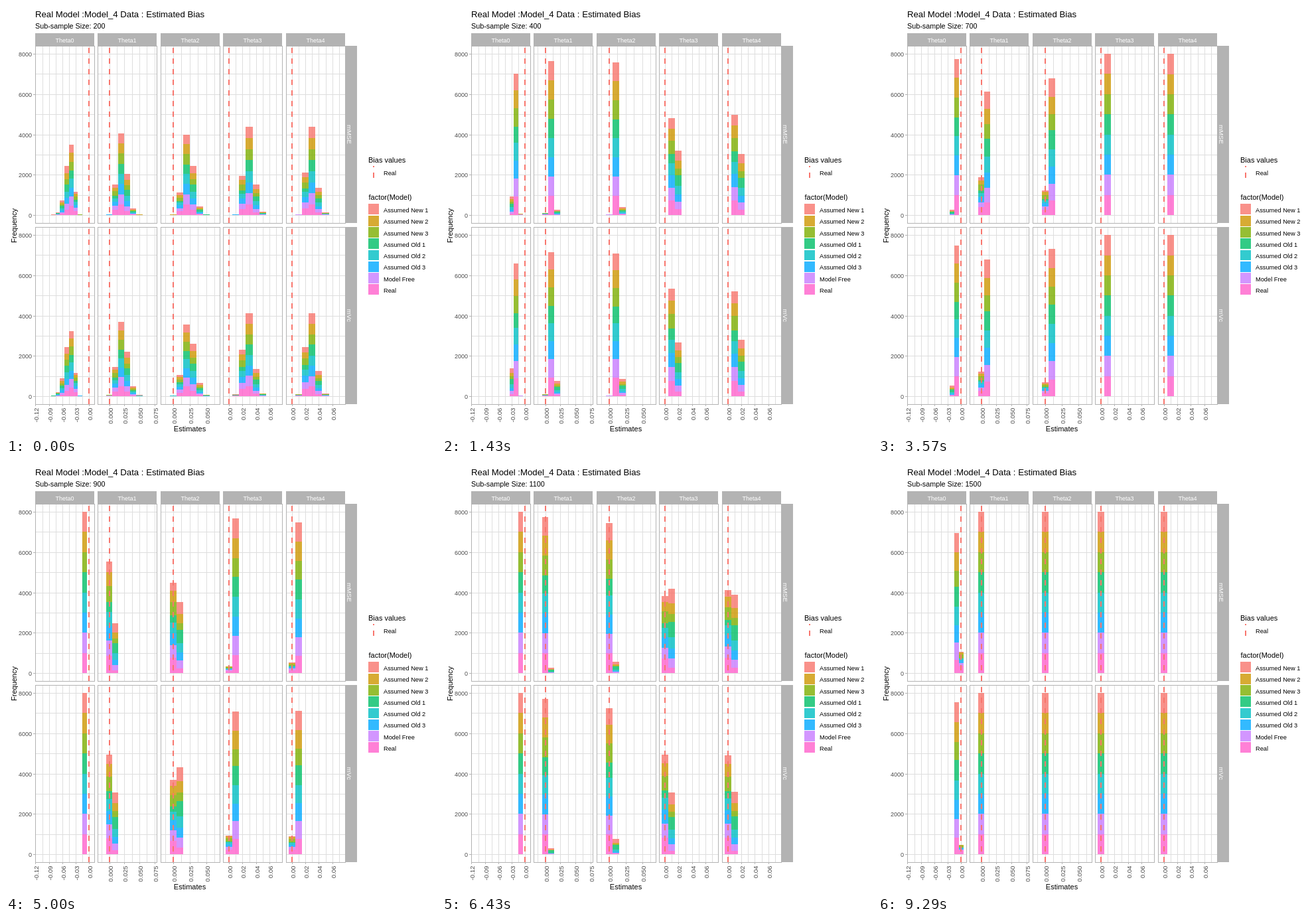
These frames come from a looping animation (648 by 648 pixels, 10 s). An HTML page:

```html
<!DOCTYPE html>
<html lang="en">
<head>
<meta charset="utf-8">
<title>Estimated Bias</title>
<style>
  html, body { margin: 0; width: 100%; height: 100%; overflow: hidden; background: #fff; }
  svg { display: block; width: 648px; height: 648px; font-family: "Liberation Sans", Arial, sans-serif; }
  rect, line { shape-rendering: crispEdges; }
  .grid { stroke: #dedede; }
  .tick { stroke: #b3b3b3; }
  .border { fill: none; stroke: #b3b3b3; }
  .strip { fill: #b3b3b3; }
  .bar { fill-opacity: .8; }
  .zero { stroke: #f8766d; stroke-width: 2; stroke-dasharray: 8 8; }
  text { font-size: 11px; }
  .title { font-size: 13.2px; }
  .subtitle { font-size: 10.8px; }
  .axis { font-size: 9px; fill: #4d4d4d; }
  .head { font-size: 9px; fill: #fff; text-anchor: middle; }
  .turned { font-size: 9.7px; }
  .key { font-size: 9.25px; }
  .mid { text-anchor: middle; }
  .end { text-anchor: end; }
</style>
</head>
<body>
<svg id="plot" viewBox="0 0 648 648"></svg>
<script>
const LOOP = 10000, STATES = 14;
const UNIT = 243 / 8000;               // pixels per count
const PANEL_W = 89, PANEL_H = 267;

// The relative spread of a row shrinks as 1 + decay / sample size.
const ROWS = [
  { name: 'mMSE', top: 60, zero: 315, decay: 300 },
  { name: 'mVc', top: 333, zero: 588, decay: 335 }
];

// Stacked from bottom to top; shift is each model's displacement in spreads.
const MODELS = [
  { name: 'Real', color: '#ff61cc', shift: -.86 },
  { name: 'Model Free', color: '#c77cff', shift: -.21 },
  { name: 'Assumed Old 3', color: '#00a9ff', shift: -.16 },
  { name: 'Assumed Old 2', color: '#00bfc4', shift: .09 },
  { name: 'Assumed Old 1', color: '#00be67', shift: .89 },
  { name: 'Assumed New 3', color: '#7cae00', shift: -.41 },
  { name: 'Assumed New 2', color: '#cd9600', shift: .04 },
  { name: 'Assumed New 1', color: '#f8766d', shift: .64 }
];

// Median bias is drift / sample size, measured in bins from zero.
const KNOTS = [0, 1, 3, 5, 7, 9, 13];
const THETAS = [
  { x: 44, zero: 125.2, bin: -6.75, grid: 10.1, first: -8, last: 0, skew: 0, spread: .08,
    labels: ['-0.12', '-0.09', '-0.06', '-0.03', '0.00'],
    drift: [[862, 853, 840, 848, 850, 855, 835], [874, 871, 870, 878, 885, 890, 874]] },
  { x: 138, zero: 155.8, bin: 9.04, grid: 11.33, first: -1, last: 6, skew: 4, spread: .14,
    labels: ['0.000', '0.025', '0.050', '0.075'],
    drift: [[420, 411, 404, 409, 411, 412, 410], [434, 433, 455, 443, 425.5, 413.5, 415]] },
  { x: 233, zero: 252, bin: 9.95, grid: 12.4, first: -1, last: 5, skew: 4, spread: .13,
    labels: ['0.000', '0.025', '0.050'],
    drift: [[447, 444, 418, 431, 438.5, 441, 445], [466, 464, 455, 472, 458, 448, 450]] },
  { x: 327, zero: 336.1, bin: 10.15, grid: 10.15, first: 0, last: 7, skew: 2, spread: .09,
    labels: ['0.00', '0.02', '0.04', '0.06'],
    drift: [[586, 577, 576.5, 580, 563, 553.5, 550], [570, 554, 566, 565, 526, 531, 535]] },
  { x: 422, zero: 431, bin: 10.1, grid: 10.1, first: 0, last: 7, skew: 2, spread: .09,
    labels: ['0.00', '0.02', '0.04', '0.06'],
    drift: [[577, 570, 573, 565, 547.5, 548, 545], [563, 554, 574, 565, 528, 532, 535]] }
];

const svg = document.getElementById('plot');

function add(parent, tag, attrs, text) {
  const el = document.createElementNS('http://www.w3.org/2000/svg', tag);
  for (const name in attrs) el.setAttribute(name, attrs[name]);
  if (text) el.textContent = text;
  return parent.appendChild(el);
}
const group = () => add(svg, 'g', {});
const line = (parent, cls, x1, y1, x2, y2) => add(parent, 'line', { class: cls, x1, y1, x2, y2 });
const rect = (parent, cls, x, y, width, height, fill) =>
  add(parent, 'rect', { class: cls, x, y, width, height, ...(fill && { fill }) });
const label = (cls, x, y, text, turn = 0) =>
  add(svg, 'text', { class: cls, transform: `translate(${x} ${y}) rotate(${turn})` }, text);
const pixel = v => Math.round(v) + .5;

const normalCdf = z => 1 / (1 + Math.exp(-1.5976 * z - .07056 * z ** 3));

function driftAt(values, state) {
  let i = 0;
  while (i < KNOTS.length - 2 && state >= KNOTS[i + 1]) i++;
  const part = (state - KNOTS[i]) / (KNOTS[i + 1] - KNOTS[i]);
  return values[i] + (values[i + 1] - values[i]) * part;
}

const backdrop = group(), bars = group(), overlay = group();

function drawPanel(theta, row) {
  const { x, zero, grid, first, last } = theta;
  const bottom = row.top + PANEL_H;
  for (let v = 0; v <= 8000; v += 1000) {
    const y = pixel(row.zero - v * UNIT);
    line(backdrop, 'grid', x, y, x + PANEL_W, y);
  }
  for (let i = first; i <= last; i++) {
    const gx = pixel(zero + i * grid);
    line(backdrop, 'grid', gx, row.top, gx, bottom);
  }
  line(overlay, 'zero', Math.round(zero), bottom, Math.round(zero), row.top);
  rect(overlay, 'border', x + .5, row.top + .5, PANEL_W, PANEL_H);
}

function drawFrame() {
  for (const row of ROWS) {
    for (const theta of THETAS) drawPanel(theta, row);
    rect(overlay, 'strip', 511, row.top, 18, PANEL_H);
    label('head turned', 514, row.top + PANEL_H / 2, row.name, 90);
    for (let v = 0; v <= 8000; v += 2000) {
      const y = pixel(row.zero - v * UNIT);
      line(backdrop, 'tick', 41, y, 44, y);
      label('axis end', 39, y + 3.5, String(v));
    }
  }
  THETAS.forEach((theta, i) => {
    rect(overlay, 'strip', theta.x, 41, PANEL_W, 19);
    label('head', theta.x + PANEL_W / 2, 55, 'Theta' + i);
    const start = theta.first - theta.first % 2;
    theta.labels.forEach((text, j) => {
      const x = pixel(theta.zero + (start + 2 * j) * theta.grid);
      line(backdrop, 'tick', x, 600, x, 603);
      label('axis end turned', x + 4.5, 605.5, text, -90);
    });
  });
  label('title', 44, 17, 'Real Model :Model_4 Data : Estimated Bias');
  label('mid', 277, 641, 'Estimates');
  label('mid', 16, 331, 'Frequency', -90);
}

function drawLegend() {
  label('', 546, 236, 'Bias values');
  line(overlay, 'zero', 554, 259, 554, 241);
  label('key', 569, 255, 'Real');
  label('', 546.5, 292, 'factor(Model)');
  [...MODELS].reverse().forEach((model, i) => {
    const y = 298.4 + i * 17.28;
    const top = Math.round(y);
    rect(overlay, 'bar', 546, top, 16, Math.round(y + 15.86) - top, model.color);
    label('key', 569, Math.round(y + 12.6), model.name);
  });
}

function drawHistogram(theta, row, drift, n, state) {
  const median = drift / n;
  const width = theta.spread * (1 + row.decay / n) * median;
  const pull = .25 + .05 * state;
  const inner = Math.sqrt(1 - .276 * pull * pull);
  const cumulative = (edge, shift) => {
    if (edge < 0) return 0;
    const mid = median + theta.skew;
    const z = Math.log((edge + theta.skew) / mid) * mid / width;
    return normalCdf((z - shift * pull) / inner);
  };
  for (let k = 0; k < 10; k++) {
    const a = Math.round(theta.zero + theta.bin * (k - .5));
    const b = Math.round(theta.zero + theta.bin * (k + .5));
    let total = 0, base = row.zero;
    for (const { color, shift } of MODELS) {
      total += 1000 * (cumulative(k + .5, shift) - cumulative(k - .5, shift));
      const top = Math.round(row.zero - total * UNIT);
      if (top < base) rect(bars, 'bar', Math.min(a, b), top, Math.abs(b - a), base - top, color);
      base = top;
    }
  }
}

drawFrame();
drawLegend();
const subtitle = label('subtitle', 44, 34, '');

function showState(state) {
  const n = 200 + 100 * state;
  subtitle.textContent = 'Sub-sample Size: ' + n;
  bars.replaceChildren();
  for (const theta of THETAS) {
    ROWS.forEach((row, r) => drawHistogram(theta, row, driftAt(theta.drift[r], state), n, state));
  }
}

const startOf = state => Math.round(state * LOOP / STATES / 10) * 10;
const begin = performance.now();
let shown = -1;

function tick() {
  const t = (performance.now() - begin) % LOOP;
  let state = STATES - 1;
  while (startOf(state) > t) state--;
  if (state !== shown) showState(shown = state);
  requestAnimationFrame(tick);
}
tick();
</script>
</body>
</html>
```
